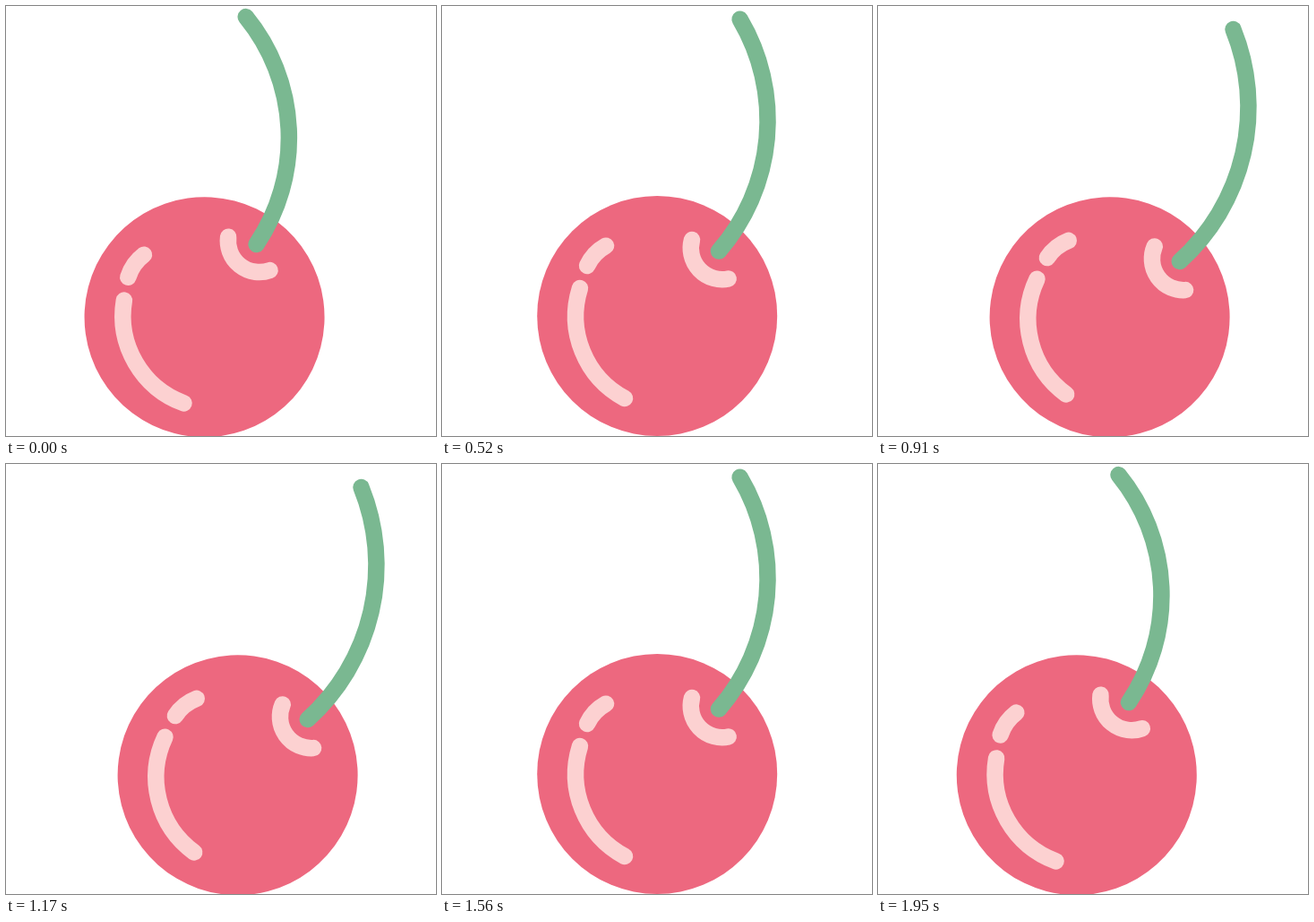
These frames come from a looping animation (480x480 px, 2.08 s). An HTML page:

```html
<!DOCTYPE html>
<html lang="en">
<head>
<meta charset="utf-8">
<title>Swinging cherry</title>
<style>
  html, body { margin: 0; width: 100%; height: 100%; overflow: hidden; background: #fff; }
  svg { display: block; width: 100vw; height: 100vh; }
  path { fill: none; stroke-width: 18.5; stroke-linecap: round; }
  .shine { stroke: #fcd1d1; }
  #stem { stroke: #7ab891; }
</style>
</head>
<body>
<svg viewBox="0 0 480 480">
  <g id="cherry">
    <circle cx="240.2" cy="346" r="134" fill="#ed687f"/>
    <path class="shine" d="M162 290A50 50 0 0 1 183 267.7"/>
    <path class="shine" d="M154 315A104 104 0 0 0 204 438"/>
    <path class="shine" d="M279 261A35 35 0 0 0 319.7 304.5"/>
    <path id="stem"/>
  </g>
</svg>
<script>
  const LOOP = 2080, STEP = 130, SWING = 8;
  const BASE = { x: 309, y: 273.6 }, SAG = 42;
  const cherry = document.getElementById('cherry');
  const stem = document.getElementById('stem');

  // Closed form of cubic-bezier(1, 0, 0, 1)
  function ease(x) {
    const t = 0.5 + Math.cbrt((x - 0.5) / 4);
    return t * t * (3 - 2 * t);
  }

  // The stem stretches a little as it leans to the right
  function stemPath(angle) {
    const x = 332.6, y = 14.7 - 0.73 * angle;
    const half = Math.hypot(x - BASE.x, y - BASE.y) / 2;
    const r = (half * half + SAG * SAG) / (2 * SAG);
    return `M${BASE.x} ${BASE.y}A${r} ${r} 0 0 0 ${x} ${y}`;
  }

  function draw(ms) {
    const time = Math.floor((ms % LOOP) / STEP) * STEP;
    const phase = time / (LOOP / 2);
    const p = phase < 1 ? ease(phase) : 1 - ease(phase - 1);
    const angle = SWING * (2 * p - 1);
    cherry.setAttribute('transform', `rotate(${angle} 240 480)`);
    stem.setAttribute('d', stemPath(angle));
  }

  const start = performance.now();
  function tick() {
    draw(performance.now() - start);
    requestAnimationFrame(tick);
  }
  tick();
</script>
</body>
</html>
```
